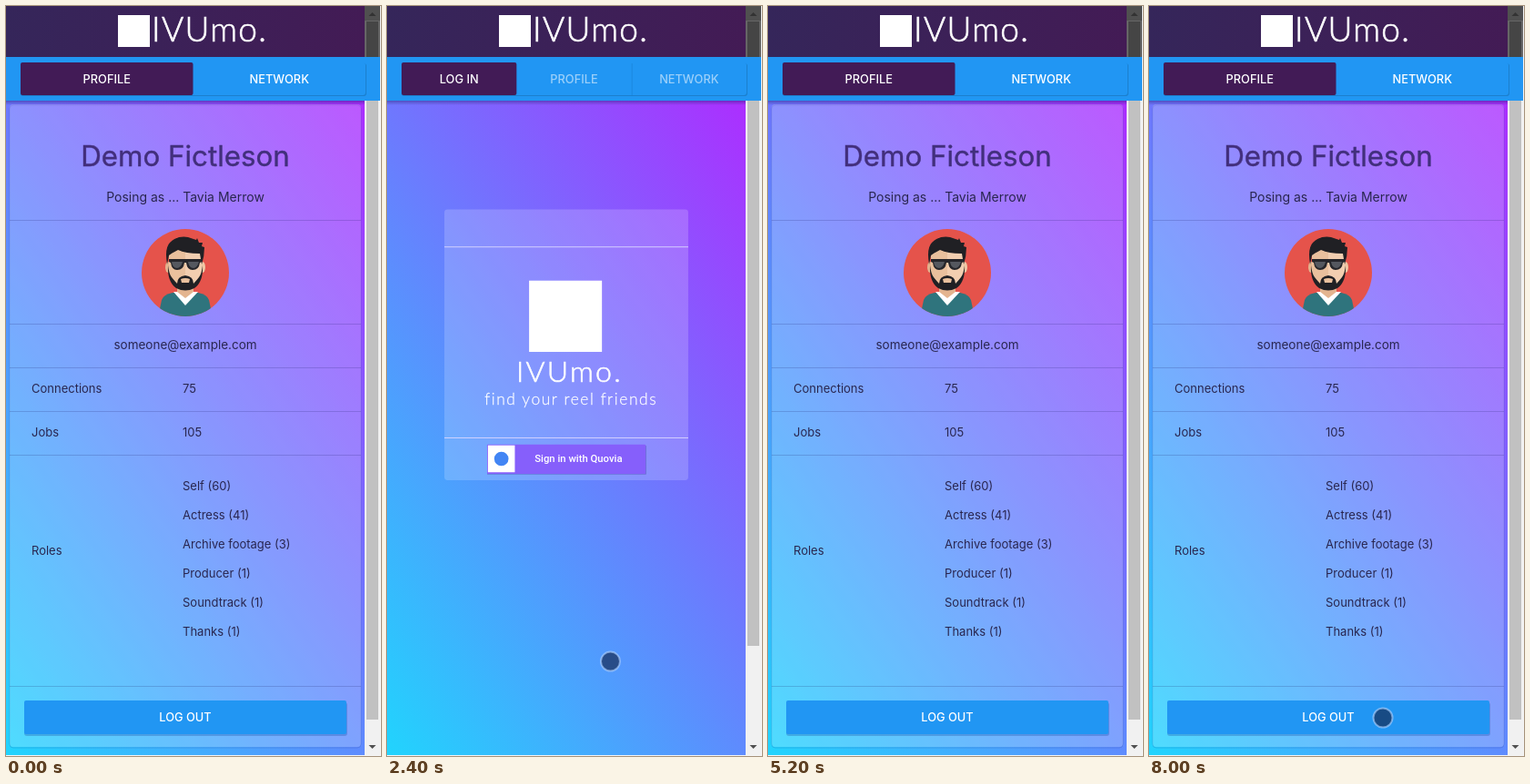
Write an HTML page that moves like this. It is 412 by 824 pixels and loops after 8.2 s.

```html
<!DOCTYPE html>
<html lang="en">
<head>
<meta charset="utf-8">
<title>Profile and sign in</title>
<style>
  html, body { margin: 0; width: 100%; height: 100%; overflow: hidden; background: #f1f1f1; }
  svg { display: block; }
  text { font-family: Inter, Roboto, sans-serif; }
  .brand text { font-family: Lato, "Open Sans", sans-serif; font-weight: 300; fill: #fff; stroke: #fff; stroke-width: .7; }
  .brand .tagline { stroke-width: .3; }
  .tab { font-size: 12.8px; font-weight: 500; fill: #fff; text-anchor: middle; }
  .bg { width: 394px; height: 824px; background: linear-gradient(55deg, #21d4fd, #b721ff); }
  .info { fill: #29264f; font-size: 13px; }
  .mid { text-anchor: middle; }
</style>
</head>
<body>
<svg id="stage" width="412" height="824" viewBox="0 0 412 824"></svg>
<script>
const stage = document.getElementById('stage');
const rect = (x, y, w, h, fill, more = '') =>
  `<rect x="${x}" y="${y}" width="${w}" height="${h}" fill="${fill}" ${more}/>`;
const text = (x, y, str, more = '') => `<text x="${x}" y="${y}" ${more}>${str}</text>`;
const line = (y, x1, x2, color) => rect(x1, y, x2 - x1, 1, color);

const backdrop = thumbEnd => `
  <foreignObject width="394" height="824"><div class="bg"></div></foreignObject>
  ${rect(394, 0, 18, 824, '#f1f1f1')}
  ${rect(396, 17, 13, thumbEnd - 17, '#c1c1c1')}
  <path d="M398.500 812h8l-4 4z" fill="#505050"/>`;

// the top band reaches above the stage so that it still covers when shifted down
function header(tabs) {
  const w = 379 / tabs.length;
  const labels = tabs.map((name, i) =>
    text(16 + w * (i + .5), 85, name, `class="tab" opacity="${i && tabs.length > 2 ? .55 : 1}"`)).join('');
  const seams = tabs.slice(2).map((_, i) => rect(16 + w * (i + 2), 63, 1, 35, '#1d88df')).join('');
  return `
    ${rect(0, 104, 394, 5, 'url(#drop)')}
    ${rect(0, -40, 394, 96, 'url(#head)')}
    ${rect(394, -40, 17, 96, '#666')}
    ${rect(394, -40, 17, 56, '#505050')}
    ${rect(396, 17, 13, 39, '#454545')}
    <path d="M398.500 11h8l-4 -4z" fill="#333"/>
    ${rect(0, 56, 411, 48, '#2196f3')}
    ${rect(16, 63, 380, 36, '#1b7fcd', 'rx="3"')}
    ${rect(16, 62, 379, 36, '#2196f3', 'rx="3"')}
    ${seams}
    ${rect(16, 62, w, 36, '#421b56', 'rx="2"')}
    ${labels}
    <g class="brand">
      ${rect(123, 10, 35, 35, '#fff')}
      ${text(160, 39, 'IVUmo.', 'font-size="37" letter-spacing="1.300"')}
    </g>`;
}

const avatar = `
  <g clip-path="url(#round)">
    ${rect(148, 244, 98, 98, '#e5534b')}
    <path d="M167 342l4-19q2-6 12-8h28q10 2 12 8l4 19z" fill="#2f747d"/>
    <path d="M184 314l13 15 14-15z" fill="#fff"/>
    <path d="M188 302h18v12l-9 7-9-7z" fill="#e3b48f"/>
    <ellipse cx="178" cy="287" rx="3" ry="6" fill="#e3b48f"/>
    <ellipse cx="216" cy="287" rx="3" ry="6" fill="#efc7a5"/>
    <path d="M179 266h36v28q-4 17-18 17t-18-17z" fill="#f2ceb0"/>
    <path d="M179 266h18v45q-14 0-18-17z" fill="#e9c09d"/>
    <path d="M177 284q-3-18 3-24 8-8 20-6l9 3 1-2 2 5 4 0-1 4 3 1q0 10-3 19l-2-12q-16 0-24-4-8 4-10 6z" fill="#202024"/>
    <path d="M178 285q1 9 4 13 4 5 6 7 0-8 9-9 9 1 9 9 2-2 6-7 3-4 4-13 1 18-9 25-10 5-20 0-10-7-9-25z" fill="#202024"/>
    <path d="M192 300q5-2 10 0l-1 4h-8z" fill="#e9c09d"/>
    <path d="M179 278h36v3l-2 1q-1 8-8 8-6 0-7-8h-2q-1 8-8 8-6 0-7-8l-2-1z" fill="#26262b"/>
    <path d="M182 281h12q-2 7-6 7-5 0-6-7zm18 0h12q-2 7-6 7-5 0-6-7z" fill="#55585f"/>
  </g>`;

const roles = ['Self (60)', 'Actress (41)', 'Archive footage (3)', 'Producer (1)', 'Soundtrack (1)', 'Thanks (1)'];
const profile = `
  ${backdrop(784)}
  ${rect(4, 109, 386, 706, 'none', 'rx="4" stroke="#304090" stroke-opacity=".2"')}
  ${rect(4, 108, 386, 706, '#fff', 'rx="4" opacity=".2"')}
  ${[235, 349, 397, 445, 493, 747].map(y => line(y, 4, 390, 'rgba(20,20,90,.18)')).join('')}
  ${text(197, 176, 'Demo Fictleson', 'class="mid" font-size="31.300" fill="#422f7c" stroke="#422f7c" stroke-width=".4"')}
  <g class="info">
    ${text(197, 215, 'Posing as ... Tavia Merrow', 'class="mid" style="font-size:14px"')}
    ${text(197, 377, 'someone@example.com', 'class="mid" style="font-size:13.5px"')}
    ${text(28, 425, 'Connections')}${text(194, 425, '75')}
    ${text(28, 473, 'Jobs')}${text(194, 473, '105')}
    ${text(28, 603, 'Roles')}
    ${roles.map((r, i) => text(194, 532 + 32 * i, r)).join('')}
  </g>
  ${avatar}
  ${rect(20, 765, 355, 37, '#205bb0', 'rx="3" opacity=".35"')}
  ${rect(20, 763, 354, 37, '#2196f3', 'rx="2"')}
  ${text(197, 786, 'LOG OUT', 'class="tab"')}
  ${header(['PROFILE', 'NETWORK'])}`;

const login = `
  ${backdrop(703)}
  <g id="card">
    ${rect(43, 222, 308, 342, '#fff', 'rx="4" opacity=".18"')}
    ${line(269, 43, 351, '#dcd8ff')}${line(510, 43, 351, '#dcd8ff')}
    <g class="brand">
      ${rect(150, 312, 92, 90, '#fff')}
      ${text(201, 440, 'IVUmo.', 'class="mid" font-size="37" letter-spacing="2.500"')}
      ${text(203, 469, 'find your reel friends', 'class="mid tagline" font-size="20" letter-spacing="1.800"')}
    </g>
    ${rect(97, 520, 201, 37, '#3c3a9a', 'rx="1" opacity=".4"')}
    ${rect(97, 519, 200, 37, '#865ffb', 'rx="1"')}
    ${rect(98, 520, 34, 34, '#fff')}
    <circle cx="115" cy="537" r="9" fill="#4285f4"/>
    ${text(157, 541, 'Sign in with Quovia', 'style="font-family:Roboto,sans-serif" font-size="13" font-weight="500" fill="#fff"')}
  </g>
  <g id="loginHead">${header(['LOG IN', 'PROFILE', 'NETWORK'])}</g>`;

const popup = `
  ${rect(384, 65, 28, 661, '#123a80', 'opacity=".3"')}
  ${rect(386, 66, 26, 658, '#2b86d8')}
  ${rect(387, 66, 25, 30, '#fff')}
  <path d="M398.500 73.500h6l4 4v9h-10zM404.500 73.500v4h4" fill="none" stroke="#555"/>
  ${rect(387, 96, 25, 28, '#5c5c5f')}
  ${rect(396, 109, 8, 6, '#fff')}
  <path d="M397.500 109v-2a2.500 2.500 0 0 1 5 0v2" fill="none" stroke="#fff" stroke-width="1.400"/>
  ${rect(387, 124, 25, 578, '#fff')}
  ${rect(387, 702, 25, 22, '#4b4b4e')}
  ${text(390, 718, 'Waiting for reply...', 'font-size="12" fill="#c4c4c8"')}`;

stage.innerHTML = `
  <defs>
    <linearGradient id="head"><stop stop-color="#35265a"/><stop offset="1" stop-color="#431b55"/></linearGradient>
    <linearGradient id="drop" x2="0" y2="1"><stop stop-color="#201860" stop-opacity=".4"/><stop offset="1" stop-color="#201860" stop-opacity="0"/></linearGradient>
    <clipPath id="round"><circle cx="197" cy="293" r="48"/></clipPath>
  </defs>
  <g>${profile}</g>
  <g id="login">${login}</g>
  ${rect(411, 0, 1, 824, '#f4f4f4')}${rect(0, 823, 412, 1, '#f4f4f4')}
  <g id="popup">${popup}</g>
  <circle id="pointer" r="10.500" fill="#142850" fill-opacity=".68" stroke="#b4d4ff" stroke-opacity=".6" stroke-width="2"/>`;

const [loginEl, cardEl, headEl, popupEl, pointer] =
  ['login', 'card', 'loginHead', 'popup', 'pointer'].map(id => document.getElementById(id));

const LOOP = 8200, STEP = 200;
// time, x, y; a null place hides the pointer
const path = [
  [0, null], [600, 330, 804], [1400, 266, 791], [2200, 266, 791], [3200, 209, 594],
  [4200, 241, 538], [4600, 241, 538], [4800, null], [7000, 296, 822], [8000, 257, 782], [LOOP, null]
];
// time, opacity, card scale, card centre y, header shift
const loginSteps = [
  [0, 0, 1, 356, 0], [2200, .3, .46, 252, 40], [2400, 1, .87, 340, 0],
  [2600, 1, 1, 356, 0], [5000, .3, 1, 356, 0], [5200, 0, 1, 356, 0]
];

function place(t) {
  const i = path.findLastIndex(p => p[0] <= t);
  const [t0, x0, y0] = path[i], [t1, x1, y1] = path[i + 1];
  if (x0 === null) return null;
  if (x1 === null) return [x0, y0];
  const k = (t - t0) / (t1 - t0), e = k * (2 - k);
  return [x0 + (x1 - x0) * e, y0 + (y1 - y0) * e];
}

function draw(t) {
  const [, alpha, scale, cy, shift] = loginSteps.findLast(s => s[0] <= t);
  loginEl.setAttribute('opacity', alpha);
  loginEl.style.display = alpha ? '' : 'none';
  cardEl.setAttribute('transform', `translate(197 ${cy}) scale(${scale}) translate(-197 -356)`);
  headEl.setAttribute('transform', `translate(0 ${shift})`);
  popupEl.style.display = t >= 4400 && t < 5000 ? '' : 'none';
  const at = place(t);
  pointer.style.display = at ? '' : 'none';
  if (at) pointer.setAttribute('transform', `translate(${at})`);
}

const start = performance.now();
function tick() {
  const t = (performance.now() - start) % LOOP;
  draw(Math.floor(t / STEP) * STEP);
  requestAnimationFrame(tick);
}
draw(0);
requestAnimationFrame(tick);
</script>
</body>
</html>
```
